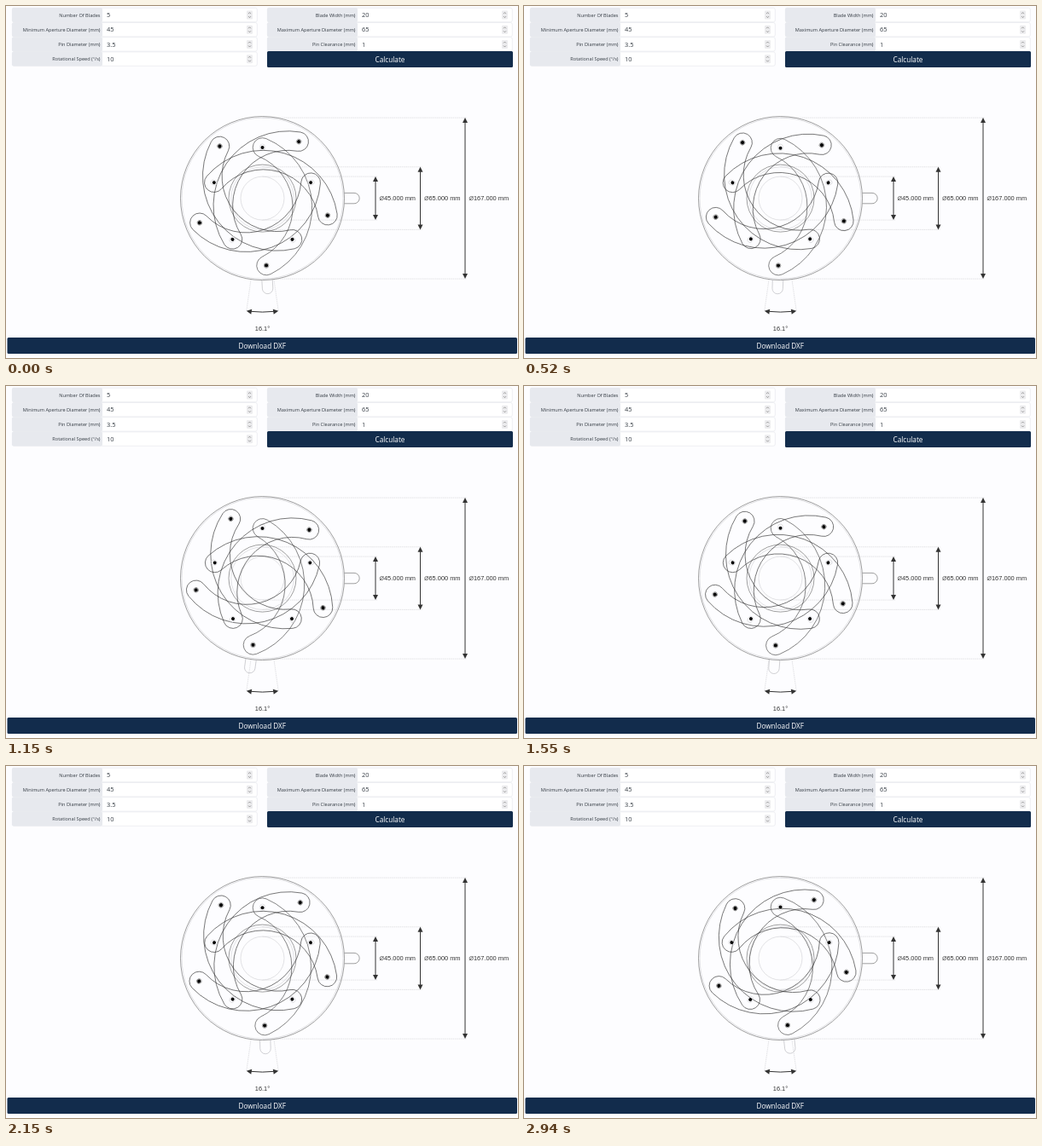
These frames come from a looping animation (600x413 px, 2.97 s). An HTML page:

```html
<!DOCTYPE html>
<html lang="en">
<head>
<meta charset="utf-8">
<title>Iris calculator</title>
<style>
  html, body { margin: 0; width: 100%; height: 100%; overflow: hidden; background: #fdfdff; }
  svg { display: block; width: 600px; height: 413px; }
  .ui { font-family: "Open Sans", "Noto Sans", sans-serif; fill: #333a42; }
  .dim { font: 7.4px "Liberation Sans", Arial, sans-serif; fill: #333; }
  .button { font-size: 8.2px; fill: #fff; text-anchor: middle; }
  .line { fill: none; stroke: #333; stroke-width: .6; }
  .rim { fill: none; stroke: #777; stroke-width: .7; }
  .faint { fill: none; stroke: #cfcfd2; stroke-width: .6; }
  .guide { fill: none; stroke: #cfcfd2; stroke-width: .6; stroke-dasharray: 1.5 .8; }
  .arrow { stroke: #333; stroke-width: 1; fill: none; }
</style>
</head>
<body>
<svg id="stage" viewBox="0 0 600 413" xmlns="http://www.w3.org/2000/svg"></svg>
<script>
const LOOP = 2970, STEP = 30;
const SWING = 8.05, SPEED = 10;          // degrees, degrees per second
const BLADES = 5, CX = 300.5, CY = 225.6;
const OUTER_PIN = 79, BLADE_RADIUS = 76.1, HALF_WIDTH = 11.3;
const RIM = 94.5, MAX_APERTURE = 36.8, MIN_APERTURE = 25.5;
const RAD = Math.PI / 180;
const stage = document.getElementById("stage");

function add(parent, tag, attrs, text) {
  const node = document.createElementNS(stage.namespaceURI, tag);
  for (const key in attrs) node.setAttribute(key, attrs[key]);
  if (text) node.textContent = text;
  parent.appendChild(node);
  return node;
}
const path = (parent, d, cls) => add(parent, "path", { d, class: cls });
const circle = (parent, r, cls) => add(parent, "circle", { r, class: cls });

function field(x, row, label, value) {
  const y = 2 + row * 17.2, mid = y + 8.6;
  add(stage, "rect", { x: x + .3, y: y + .3, width: 287, height: 16.4, rx: 2, fill: "#fff", stroke: "#e2e4e9", "stroke-width": .6 });
  add(stage, "rect", { x, y, width: 106, height: 17, rx: 2, fill: "#e7e9ee" });
  add(stage, "text", { x: x + 103.5, y: mid + 2, class: "ui", "font-size": 5.6, "text-anchor": "end" }, label);
  add(stage, "text", { x: x + 111, y: mid + 2.5, class: "ui", "font-size": 7.4 }, value);
  add(stage, "rect", { x: x + 275, y: mid - 5, width: 7, height: 10, rx: 1, fill: "#ececee" });
  const chevrons = `M${x + 277},${mid - 1.5}l1.5,-1.5 1.5,1.5M${x + 277},${mid + 1.5}l1.5,1.5 1.5,-1.5`;
  add(stage, "path", { d: chevrons, fill: "none", stroke: "#777", "stroke-width": .7 });
}

function button(x, y, width, height, label) {
  add(stage, "rect", { x, y, width, height, rx: 1.5, fill: "#122c4c" });
  add(stage, "text", { x: x + width / 2, y: y + height / 2 + 3, class: "ui button" }, label);
}

function arrowHead(parent, x, y, angle) {
  add(parent, "path", { d: "M0,0L-6,-3V3Z", fill: "#333", transform: `translate(${x},${y}) rotate(${angle})` });
}

function diameter(x, r, label) {
  for (const side of [-1, 1]) {
    path(stage, `M${CX},${CY + side * r}H${x + 2}`, "guide");
    arrowHead(stage, x, CY + side * r, side * 90);
  }
  path(stage, `M${x},${CY - r + 4}V${CY + r - 4}`, "arrow");
  add(stage, "circle", { cx: x + 7.3, cy: CY, r: 2.1, class: "line" });
  path(stage, `M${x + 5},${CY + 2.5}l4.6,-5`, "line");
  add(stage, "text", { x: x + 10, y: CY + 2.6, class: "dim" }, label + " mm");
}

function swingDimension(parent) {
  const r = 133.5, x = r * Math.sin(SWING * RAD), y = r * Math.cos(SWING * RAD);
  for (const side of [-1, 1]) {
    path(parent, `M${side * x * .72},${y * .72}L${side * x},${y}`, "guide");
    arrowHead(parent, side * x, y, side < 0 ? 180 + SWING + 1 : -SWING - 1);
  }
  path(parent, `M${4 - x},${y + .5}A${r},${r} 0 0 0 ${x - 4},${y + .5}`, "arrow");
  add(parent, "text", { x: 0, y: 155.2, class: "dim", "text-anchor": "middle" }, "16.1°");
}

// Constant-width arc from the outer pin p, counter-clockwise, to the inner pin q.
function bladePath(p, q) {
  const dx = q.x - p.x, dy = q.y - p.y, chord = Math.hypot(dx, dy);
  const sink = Math.sqrt(BLADE_RADIUS ** 2 - chord ** 2 / 4) / chord;
  const c = { x: (p.x + q.x) / 2 + dy * sink, y: (p.y + q.y) / 2 - dx * sink };
  const edge = (pin, offset) => {
    const k = 1 + offset / BLADE_RADIUS;
    return `${c.x + (pin.x - c.x) * k},${c.y + (pin.y - c.y) * k}`;
  };
  const arc = (r, sweep, to) => `A${r},${r} 0 0 ${sweep} ${to}`;
  const w = HALF_WIDTH;
  return "M" + edge(p, w) + arc(BLADE_RADIUS + w, 0, edge(q, w)) + arc(w, 0, edge(q, -w)) +
    arc(BLADE_RADIUS - w, 1, edge(p, -w)) + arc(w, 0, edge(p, w)) + "Z";
}

const fields = [
  [["Number Of Blades", "5"], ["Minimum Aperture Diameter (mm)", "45"], ["Pin Diameter (mm)", "3.5"], ["Rotational Speed (°/s)", "10"]],
  [["Blade Width (mm)", "20"], ["Maximum Aperture Diameter (mm)", "65"], ["Pin Clearance (mm)", "1"]]
];
fields.forEach((column, i) => column.forEach(([label, value], row) => field(i ? 306 : 7, row, label, value)));
button(306, 53, 288, 19, "Calculate");
button(1.5, 389, 597.5, 19, "Download DXF");

diameter(433, MIN_APERTURE, "45.000");
diameter(485.5, MAX_APERTURE, "65.000");
diameter(538, RIM, "167.000");

const iris = add(stage, "g", { transform: `translate(${CX},${CY})` });
swingDimension(iris);
circle(iris, MIN_APERTURE, "faint");
circle(iris, MAX_APERTURE, "faint");
circle(iris, 39.5, "rim");
circle(iris, RIM, "faint");
circle(iris, 96, "rim");
path(iris, "M96,-6.2H107.5A6.2,6.2 0 0 1 107.5,6.2H96", "rim");
const handle = path(iris, "M-6.2,96V106A6.2,6.2 0 0 0 6.2,106V96", "faint");
handle.style.stroke = "#b4b4b8";

const blades = Array.from({ length: BLADES }, (_, i) => {
  const g = add(iris, "g", { transform: `rotate(${i * 360 / BLADES})` });
  add(g, "rect", { x: -2.8, y: -63.5, width: 5.6, height: 7.5, rx: 2.8, class: "faint" });
  return {
    body: path(g, "", "line"),
    ring: circle(g, 2.8, "rim"),
    outer: circle(g, 2.1),
    inner: circle(g, 2)
  };
});

function swingAngle(ms) {
  const period = 4 * SWING / SPEED, p = (ms / 1000 + .475) % period;
  return SWING - SPEED * Math.min(p, period - p);
}

function place(node, point) {
  node.setAttribute("cx", point.x);
  node.setAttribute("cy", point.y);
}

function draw(ms) {
  const angle = swingAngle(Math.floor(ms / STEP) * STEP);
  const p = { x: OUTER_PIN * Math.sin(angle * RAD), y: OUTER_PIN * Math.cos(angle * RAD) };
  const q = { x: 0, y: -58.7 - .0068 * (angle + SWING) ** 2 };
  const d = bladePath(p, q);
  handle.setAttribute("transform", `rotate(${-angle})`);
  for (const blade of blades) {
    blade.body.setAttribute("d", d);
    place(blade.ring, p);
    place(blade.outer, p);
    place(blade.inner, q);
  }
}

const start = performance.now();
function tick() {
  draw((performance.now() - start) % LOOP);
  requestAnimationFrame(tick);
}
tick();
</script>
</body>
</html>
```
